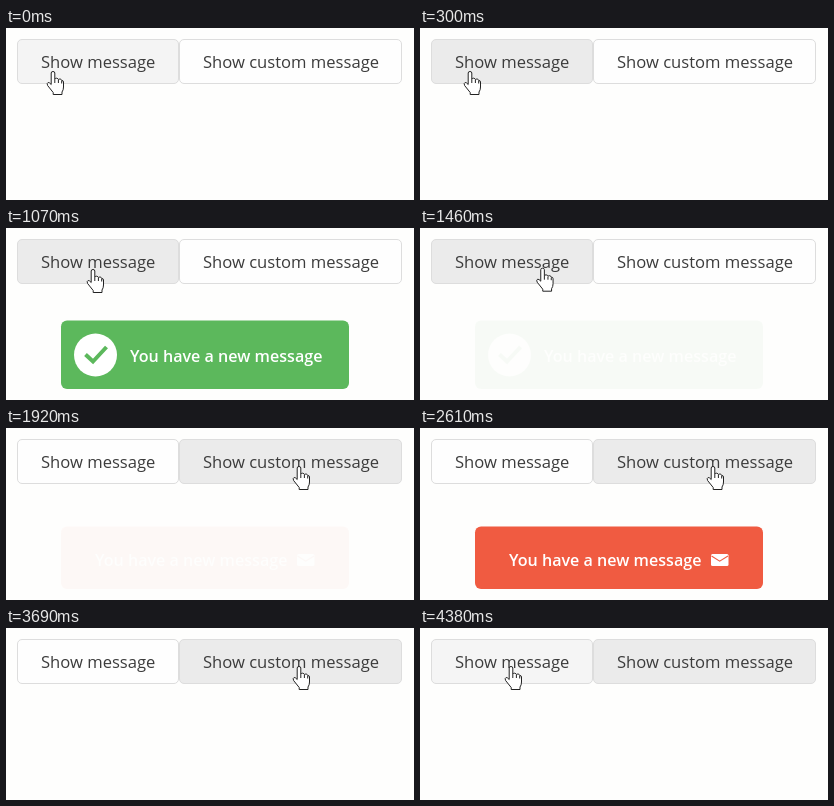
Recreate the animation shown at these times as an HTML page. Size 408x172 px, loop 4460 ms.

```html
<!DOCTYPE html>
<html lang="en">
<head>
<meta charset="utf-8">
<title>Toast messages</title>
<style>
  html, body { margin: 0; width: 100%; height: 100%; overflow: hidden; background: #fefefd; }
  svg { display: block; width: 408px; height: 172px; }
  text { font: 400 16.6px "Open Sans", "Noto Sans", sans-serif; fill: #3c3c3c; }
  .button { stroke: #ddd; }
  .toast text { font-size: 16.1px; font-weight: 600; fill: #fff; }
</style>
</head>
<body>
<svg viewBox="0 0 408 172">
  <rect id="plain" class="button" x="11.5" y="11.5" width="161" height="44" rx="4.5"/>
  <rect id="custom" class="button" x="173.5" y="11.5" width="222" height="44" rx="4.5"/>
  <text x="35" y="40">Show message</text>
  <text x="197" y="40">Show custom message</text>

  <g id="success" class="toast">
    <rect x="55" y="92.5" width="288" height="68.5" rx="6" fill="#5cb85c"/>
    <circle cx="89.5" cy="127" r="21.5" fill="#fff"/>
    <path d="M79.5 126.5L87 133.5L100.5 119" fill="none" stroke="#5cb85c" stroke-width="4"/>
    <text x="124" y="134">You have a new message</text>
  </g>

  <g id="mail" class="toast">
    <rect x="55" y="98.5" width="288" height="62.5" rx="6" fill="#f05b41"/>
    <text x="89" y="138">You have a new message</text>
    <rect x="291" y="126" width="17.5" height="12" rx="1.5" fill="#fff"/>
    <path d="M291.5 128L299.7 133.2L308 128" fill="none" stroke="#f05b41" stroke-width="1.1"/>
  </g>

  <g id="hand" fill="#fff" stroke="#222" stroke-linejoin="round">
    <path d="M-1.8 2Q-1.8 .5 0 .5Q1.8 .5 1.8 2V8Q2.1 7.2 3.6 7.2Q5.3 7.4 5.4 8.6Q6 8 7.2 8Q8.5 8.3 8.7 9.6Q10.4 9.2 10.5 11V16Q10.5 19 9 21V23.5H.2V21.5L-5.4 14.5Q-6.5 12.2 -4.9 11.5Q-3.6 11.3 -1.8 13.5Z"/>
    <path d="M1.8 8V12M5.4 9V12M8.7 10V12.5" fill="none"/>
  </g>
</svg>
<script>
const LOOP = 4460, FPS = 13;
const $ = id => document.getElementById(id);

// CSS "ease": cubic-bezier(.25, .1, .25, 1)
function ease(x) {
  const bez = (u, a, b) => 3 * u * (1 - u) * (1 - u) * a + 3 * u * u * (1 - u) * b + u * u * u;
  let lo = 0, hi = 1;
  for (let i = 0; i < 20; i++) {
    const mid = (lo + hi) / 2;
    if (bez(mid, .25, .25) < x) lo = mid; else hi = mid;
  }
  return bez(lo, .1, 1);
}
const smooth = x => x * x * (3 - 2 * x);
const linear = x => x;

// Steps are [time, ...values].
function at(steps, t, curve = linear) {
  const next = steps.findIndex(s => s[0] > t);
  if (next < 0) return steps[steps.length - 1].slice(1);
  if (next === 0) return steps[0].slice(1);
  const a = steps[next - 1], b = steps[next];
  const p = curve((t - a[0]) / (b[0] - a[0]));
  return a.slice(1).map((v, i) => v + (b[i + 1] - v) * p);
}

const handPath = [
  [0, 47, 43], [300, 50, 43], [600, 55, 43], [1070, 87, 41], [1380, 91, 40],
  [1700, 293, 38], [4160, 293, 38], [4380, 91, 38]
];
const shade = {
  plain: [[0, 244], [150, 235], [1540, 235], [1750, 254], [4320, 254], [4380, 245]],
  custom: [[0, 254], [1540, 254], [1750, 235]]
};
const fade = start => [[start, 0], [start + 400, 1], [start + 720, 1], [start + 1120, 0]];
const toasts = { success: fade(440), mail: fade(1900) };

function render(ms) {
  const frame = Math.floor((Math.floor(ms / 10) + .999) * FPS / 100);
  const t = Math.floor(frame * 100 / FPS) * 10;
  $('hand').setAttribute('transform', `translate(${at(handPath, t, smooth)})`);
  for (const id in shade) {
    const v = Math.round(at(shade[id], t)[0]);
    $(id).setAttribute('fill', `rgb(${v},${v},${v})`);
  }
  for (const id in toasts) $(id).setAttribute('opacity', at(toasts[id], t, ease)[0]);
}

const start = performance.now();
function tick() {
  render((performance.now() - start) % LOOP);
  requestAnimationFrame(tick);
}
tick();
</script>
</body>
</html>
```
